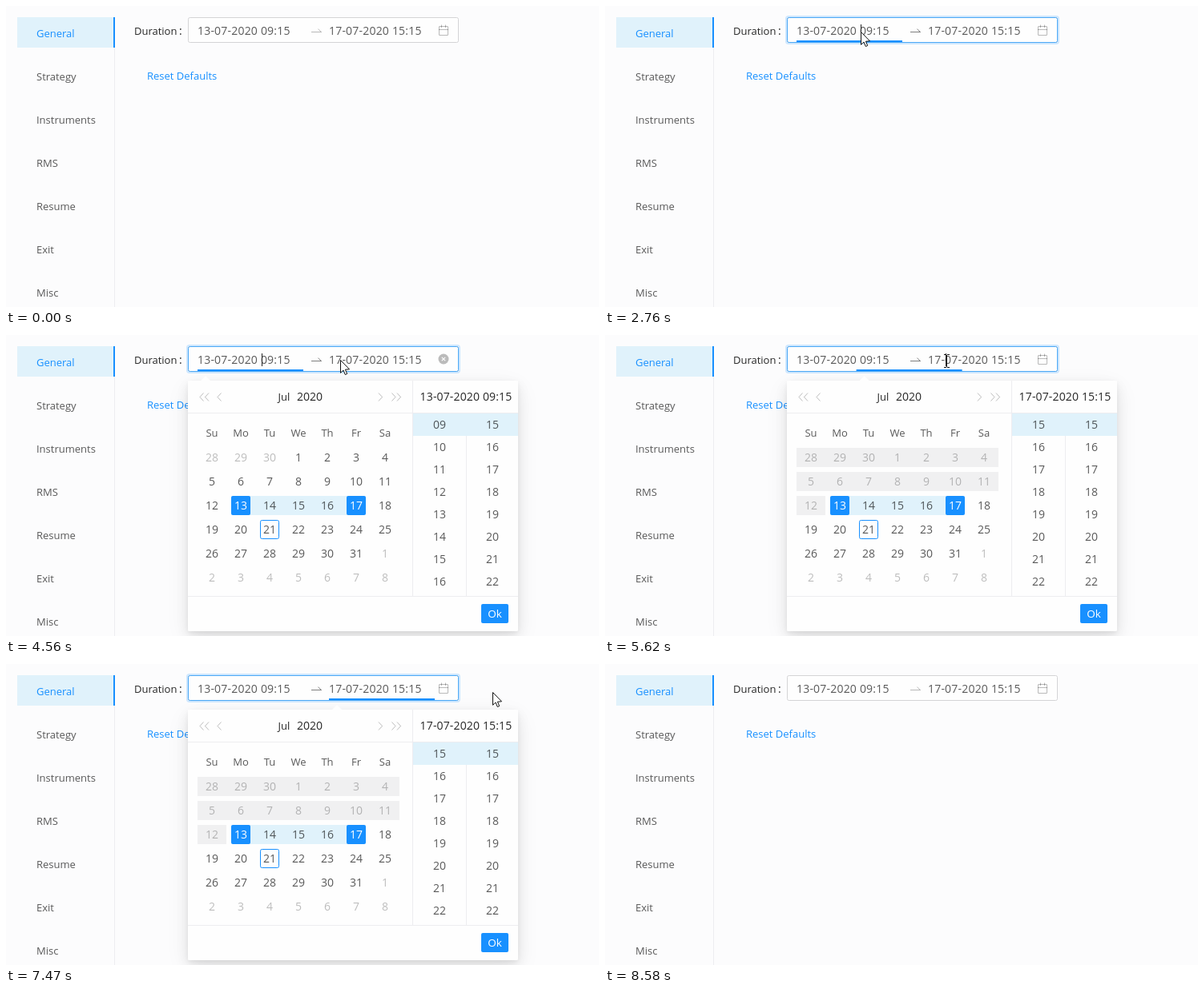
An HTML page with a canvas that plays this animation: 740 by 376 pixels, repeating every 9800 ms.

```html
<!DOCTYPE html>
<html lang="en">
<head>
<meta charset="utf-8">
<title>Date range picker</title>
<style>
  html, body { margin: 0; width: 100%; height: 100%; overflow: hidden; background: #fcfcfd; }
  canvas { display: block; width: 740px; height: 376px; }
</style>
</head>
<body>
<canvas id="stage"></canvas>
<script>
const W = 740, H = 376, LOOP = 9800;
const BLUE = '#1890ff', PALE = '#e0f2fb', PAPER = '#fefefe', LINE = '#ededf0';
const DARK = 'rgba(0,0,0,.85)', TEXT = 'rgba(0,0,0,.65)', FAINT = 'rgba(0,0,0,.26)';
const FAMILY = '"Open Sans", "Noto Sans", sans-serif';

// Key moments in ms
const HOVER = 970, CLICK = 2400, OPEN = 2780, SWITCH = 5480, LEAVE = 7050, BLUR = 7600, CLOSE = 7700;

const canvas = document.getElementById('stage');
const ctx = canvas.getContext('2d');
const dpr = window.devicePixelRatio || 1;
canvas.width = W * dpr;
canvas.height = H * dpr;

const clamp = p => Math.min(1, Math.max(0, p));
const smooth = p => { p = clamp(p); return p * p * (3 - 2 * p); };
const mix = (a, b, p) => a + (b - a) * p;
const ramp = (t, on, off) => smooth((t - on) / 300) - smooth((t - off) / 300);
const pad = n => String(n).padStart(2, '0');

function faded(alpha, draw) {
  if (alpha <= 0) return;
  ctx.save();
  ctx.globalAlpha *= alpha;
  draw();
  ctx.restore();
}

function text(str, x, y, color, size = 13, align = 'left', spacing = 0) {
  ctx.font = `${size}px ${FAMILY}`;
  ctx.letterSpacing = spacing + 'px';
  ctx.textAlign = align;
  ctx.fillStyle = color;
  ctx.fillText(str, x, y);
}

function rect(x, y, w, h, color, r = 0) {
  ctx.fillStyle = color;
  ctx.beginPath();
  ctx.roundRect(x, y, w, h, r);
  ctx.fill();
}

function outline(x, y, w, h, color, width = 1, r = 2) {
  ctx.strokeStyle = color;
  ctx.lineWidth = width;
  ctx.beginPath();
  ctx.roundRect(x, y, w, h, r);
  ctx.stroke();
}

function path(points, color, width = 1) {
  ctx.strokeStyle = color;
  ctx.lineWidth = width;
  ctx.beginPath();
  points.forEach(([x, y]) => ctx.lineTo(x, y));
  ctx.stroke();
}

function sidebar() {
  rect(135, 14, 1, H, LINE);
  rect(14, 14, 120, 38, PALE);
  rect(134, 14, 2, 38, BLUE);
  ['General', 'Strategy', 'Instruments', 'RMS', 'Resume', 'Exit', 'Misc']
    .forEach((name, i) => text(name, 38, 39 + 54 * i, i ? TEXT : BLUE));
}

function calendarIcon() {
  const color = 'rgba(0,0,0,.27)';
  outline(540.5, 25.5, 11, 11, color, 1, 0.5);
  path([[540, 29.5], [552, 29.5]], color);
  path([[543.5, 23.5], [543.5, 27]], color);
  path([[548.5, 23.5], [548.5, 27]], color);
}

function clearIcon() {
  rect(539.5, 23.5, 13, 13, '#bbb', 6.5);
  path([[543.8, 27.8], [548.2, 32.2]], PAPER, 1.2);
  path([[548.2, 27.8], [543.8, 32.2]], PAPER, 1.2);
}

function input(t) {
  const focus = ramp(t, CLICK, BLUR);
  const blue = Math.max(focus, ramp(t, HOVER, LEAVE));
  const slide = smooth((t - SWITCH) / 300);

  faded(focus, () => outline(226, 13, 340, 34, 'rgba(24,144,255,.2)', 2, 3));
  rect(227, 14, 338, 32, PAPER, 2);
  outline(227.5, 14.5, 337, 31, '#d4d4d6');
  faded(blue, () => outline(227.5, 14.5, 337, 31, '#4aa8f6'));

  text('13-07-2020 09:15', 239, 36, TEXT, 14, 'left', 0.2);
  text('17-07-2020 15:15', 403, 36, TEXT, 14, 'left', 0.2);
  path([[381, 32.5], [393.5, 32.5], [389.5, 28.8]], `rgba(0,0,0,${mix(0.28, 0.5, focus)})`);
  faded(focus ** 2, () => rect(mix(239, 403, slide), 43, 132, 2, BLUE));

  const clearable = (t > HOVER && t < CLICK) || (t > 4000 && t < 5100);
  clearable ? clearIcon() : calendarIcon();

  if (t >= CLICK && t < BLUR) {
    const second = t >= SWITCH;
    const lit = Math.floor((t - (second ? SWITCH : CLICK)) / 530) % 2 === 0;
    if (lit) rect(second ? 425 : 319, 23, 1, 16, '#222');
  }
}

function chevron(x, dir) {
  path([[x + 4.5 * dir, 72.5], [x, 77.5], [x + 4.5 * dir, 82.5]], FAINT);
}

function days(second) {
  ['Su', 'Mo', 'Tu', 'We', 'Th', 'Fr', 'Sa']
    .forEach((d, i) => text(d, 257 + 36 * i, 127, TEXT, 13, 'center'));

  if (second) {
    const off = '#f0f0f1';
    rect(239, 141, 252, 24, off);
    rect(239, 171, 252, 24, off);
    rect(239, 201, 36, 24, off);
  }
  rect(293, 201, 144, 24, PALE);
  rect(281, 201, 24, 24, BLUE, 2);
  rect(425, 201, 24, 24, BLUE, 2);
  outline(317.5, 231.5, 23, 23, BLUE);

  for (let i = 0; i < 42; i++) {
    const n = i - 2;
    const label = n < 1 ? n + 30 : n > 31 ? n - 31 : n;
    const dim = n < 1 || n > 31 || (second && n < 13);
    const color = n === 13 || n === 17 ? '#fff' : dim ? FAINT : TEXT;
    text(label, 257 + 36 * (i % 7), 158 + 30 * Math.floor(i / 7), color, 14, 'center');
  }
}

function times(second) {
  rect(508, 98, 131, 28, PALE);
  for (let i = 0; i < 8; i++) {
    const y = 117 + 28 * i;
    text(pad((second ? 15 : 9) + i), 541, y, TEXT, 14, 'center');
    text(15 + i, 607, y, TEXT, 14, 'center');
  }
}

function panelBox(notch) {
  ctx.save();
  for (const [dy, blur, a] of [[2, 5, 0.05], [6, 16, 0.08], [9, 30, 0.07]]) {
    ctx.shadowColor = `rgba(0,0,0,${a})`;
    ctx.shadowBlur = blur * dpr;
    ctx.shadowOffsetY = dy * dpr;
    rect(227, 57, 412, 313, PAPER, 2);
  }
  ctx.restore();
  ctx.fillStyle = PAPER;
  ctx.beginPath();
  ctx.moveTo(notch - 7, 58);
  ctx.lineTo(notch, 51);
  ctx.lineTo(notch + 7, 58);
  ctx.fill();
}

function popup(t) {
  if (t < OPEN || t > CLOSE + 200) return;
  const shown = 1 - (1 - clamp((t - OPEN) / 200)) ** 5 - clamp((t - CLOSE) / 200) ** 5;
  const second = t >= SWITCH;

  faded(shown, () => {
    ctx.translate(0, 57);
    ctx.scale(1, mix(0.8, 1, shown));
    ctx.translate(0, -57);

    panelBox(mix(249, 413, smooth((t - SWITCH) / 300)));
    rect(227, 97, 412, 1, LINE);
    rect(227, 326, 412, 1, LINE);
    rect(507, 57, 1, 270, LINE);
    rect(574, 126, 1, 200, LINE);

    [242, 248.5, 264].forEach(x => chevron(x, 1));
    [469.5, 486, 492.5].forEach(x => chevron(x, -1));
    text('Jul', 339.5, 82, DARK);
    text('2020', 363, 82, DARK, 14);
    text(second ? '17-07-2020 15:15' : '13-07-2020 09:15', 574, 82, DARK, 14, 'center', 0.15);

    days(second);
    times(second);
    rect(593, 336, 34, 24, BLUE, 2);
    text('Ok', 610, 353, '#fff', 13.5, 'center');
  });
}

// Pointer legs: start, end, from x, from y, to x, to y
const LEGS = [
  [160, 1080, 362, 378, 320, 33],
  [CLICK, CLICK + 100, 320, 33, 319, 32],
  [4000, 4500, 319, 32, 417, 31],
  [4700, 4950, 417, 31, 426, 32],
  [6400, 7300, 426, 32, 607, 35],
  [8130, 8570, 607, 35, 604, 378]
];

function pointer(t) {
  if (t < 160 || t >= 8570) return;
  const [a, b, x0, y0, x1, y1] = LEGS.filter(leg => t >= leg[0]).pop();
  const p = smooth((t - a) / (b - a));
  const x = mix(x0, x1, p), y = mix(y0, y1, p);
  const beam = (t > HOVER && t < CLICK + 100) || (t > 4800 && t < LEAVE && x < 536);

  ctx.save();
  ctx.translate(Math.round(x), Math.round(y));
  beam ? iBeam() : arrow();
  ctx.restore();
}

function iBeam() {
  rect(0, -7, 1, 15, '#111');
  for (const y of [-8, 8]) {
    rect(-3, y, 3, 1, '#111');
    rect(1, y, 3, 1, '#111');
  }
}

function arrow() {
  ctx.beginPath();
  [[0.5, 0.5], [0.5, 16.3], [4, 13], [6.3, 18.5], [8.7, 17.5], [6.4, 12.2], [11.5, 11.8]]
    .forEach(([x, y]) => ctx.lineTo(x, y));
  ctx.closePath();
  ctx.fillStyle = '#fff';
  ctx.fill();
  ctx.strokeStyle = '#111';
  ctx.lineWidth = 1;
  ctx.stroke();
}

function draw(t) {
  ctx.setTransform(dpr, 0, 0, dpr, 0, 0);
  rect(0, 0, W, H, '#fcfcfd');
  sidebar();
  text('Duration', 160, 36, DARK);
  text(':', 216, 36, DARK, 14);
  text('Reset Defaults', 176, 92, BLUE);
  input(t);
  popup(t);
  pointer(t);
}

const start = performance.now();
function tick() {
  draw((performance.now() - start) % LOOP);
  requestAnimationFrame(tick);
}
tick();
</script>
</body>
</html>
```
